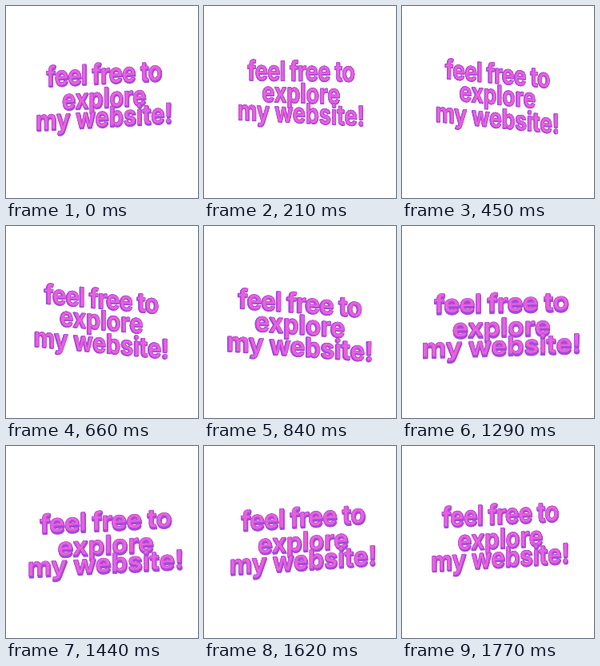
Animation of 240x240 px, one loop 1800 ms. Source, as an HTML page:

```html
<!DOCTYPE html>
<html lang="en">
<head>
<meta charset="utf-8">
<style>
html, body { margin: 0; width: 100%; height: 100%; overflow: hidden; background: #fff; }
svg { display: block; width: 100vw; height: 100vh; }
text {
  font: 700 34px Inter, "Liberation Sans", sans-serif;
  text-anchor: middle;
  stroke-linejoin: round;
}
.side { fill: #a24bdc; stroke: #a24bdc; stroke-width: 1.1px; }
.face { fill: #ea60da; stroke: #a84bd8; stroke-width: .7px; }
</style>
</head>
<body>
<svg id="stage" viewBox="0 0 240 240"></svg>
<script>
const LOOP = 1800, STEP = 30, LAYERS = 4;
const LINES = [
  { text: "feel free to", spacing: -0.75 },
  { text: "explore", spacing: 0 },
  { text: "my website!", spacing: 0 }
];

// time, centre x, width scale, height scale, slope of first and last line,
// lower edge of each line, depth offset x and y
const POSES = [
  [0,    122.8, .85, 1.00, -.050, -.056,  98.5, 128.5, 152.5,  .8, 1.6],
  [210,  121.3, .79, 1.00,  .012,  .050,  94.5, 122.0, 147.0,  .2,  .6],
  [450,  119.3, .77,  .98,  .090,  .100,  97.5, 124.0, 153.0, -.6,  .6],
  [840,  119.7, .91,  .98,  .072,  .072, 109.5, 136.5, 164.0, -1.2, 1],
  [1110, 123.0, .99,  .93,  .022,  .006, 111.5, 141.5, 166.0, -.6, 2.4],
  [1440, 124.8, .97,  .93, -.050, -.054, 107.5, 137.5, 160.5,  .8, 2.6]
];

const stage = document.getElementById("stage");
const lines = LINES.map(({ text, spacing }) =>
  Array.from({ length: LAYERS + 1 }, (_, i) => {
    const node = document.createElementNS("http://www.w3.org/2000/svg", "text");
    node.textContent = text;
    node.setAttribute("class", i < LAYERS ? "side" : "face");
    node.style.letterSpacing = spacing + "px";
    stage.append(node);
    return node;
  }));

function keyAt(i) {
  const n = POSES.length, turn = Math.floor(i / n);
  const [time, ...values] = POSES[i - turn * n];
  return { time: time + turn * LOOP, values };
}

// Smooth periodic interpolation through the poses.
function poseAt(t) {
  let i = POSES.length - 1;
  while (POSES[i][0] > t) i--;
  const [a, b, c, d] = [-1, 0, 1, 2].map(k => keyAt(i + k));
  const span = c.time - b.time, u = (t - b.time) / span;
  return b.values.map((start, k) => {
    const end = c.values[k];
    const m0 = (end - a.values[k]) / (c.time - a.time) * span;
    const m1 = (d.values[k] - start) / (d.time - b.time) * span;
    const rise = u * u * (3 - 2 * u);
    return start + (end - start) * rise
      + m0 * u * (1 - u) ** 2 - m1 * u * u * (1 - u);
  });
}

function draw(t) {
  const [x, sx, sy, slopeTop, slopeEnd, y1, y2, y3, dx, dy] = poseAt(t);
  const bottoms = [y1, y2, y3];
  lines.forEach((layers, row) => {
    const slope = slopeTop + (slopeEnd - slopeTop) * row / 2;
    layers.forEach((node, i) => {
      const depth = 1 - i / LAYERS;
      const left = x + dx * (depth - .5);
      const base = bottoms[row] - .6 - dy * (1 - depth);
      node.setAttribute("transform",
        `matrix(${sx} ${slope * sx} 0 ${sy} ${left} ${base})`);
    });
  });
}

const start = performance.now();
function tick() {
  const t = (performance.now() - start) % LOOP;
  draw(Math.floor(t / STEP) * STEP);
  requestAnimationFrame(tick);
}
draw(0);
requestAnimationFrame(tick);
</script>
</body>
</html>
```
